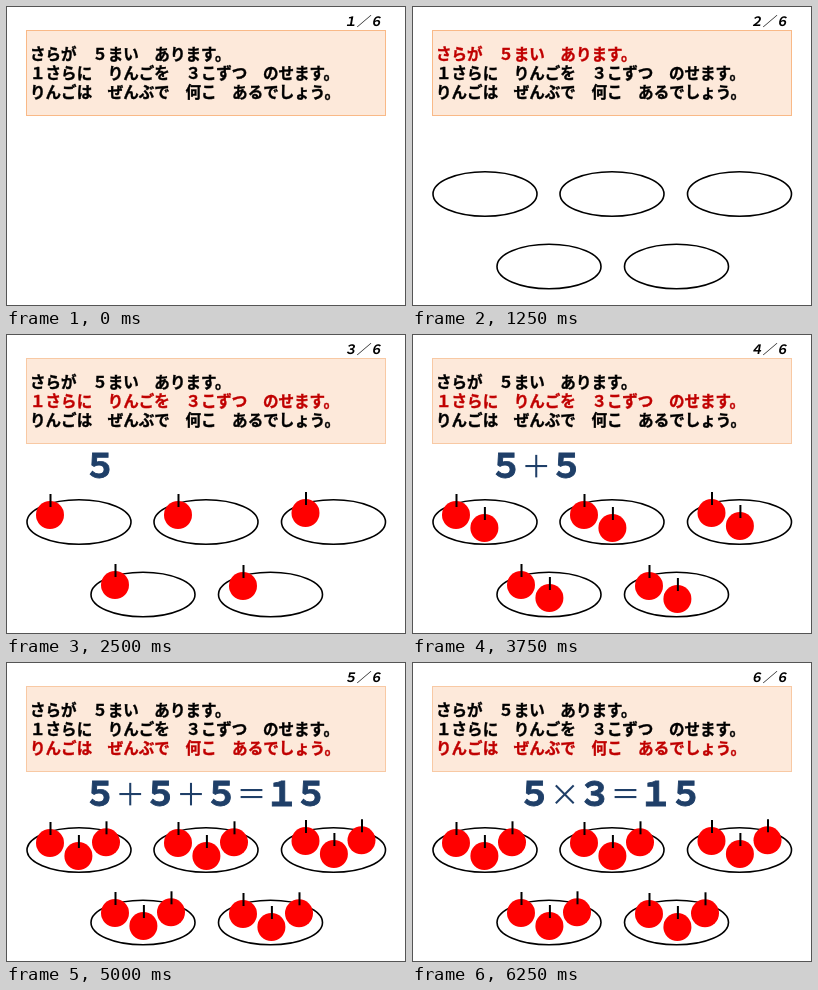
Recreate the animation shown at these times as an HTML page. Size 400 by 300 pixels, loop 7500 ms.

```html
<!DOCTYPE html>
<html lang="ja">
<head>
<meta charset="utf-8">
<style>
html, body { margin: 0; width: 100%; height: 100%; overflow: hidden; background: #fff; }
svg { display: block; width: 100vw; height: 100vh; }
text { font-family: "Noto Sans CJK JP", "Noto Sans CJK", sans-serif; font-weight: 900; }
.line { font-size: 15.55px; stroke-width: .35; }
.page { font-size: 13px; text-anchor: middle; }
.sum { fill: #1f3f68; text-anchor: middle; }
.digit { font-size: 34px; stroke: #1f3f68; stroke-width: .9; }
.sign { font-size: 30px; font-weight: 500; }
</style>
</head>
<body>
<svg viewBox="0 0 400 300">
  <rect width="400" height="300" fill="#fff"/>
  <rect x=".5" y=".5" width="399" height="299" fill="none" stroke="#555"/>
  <rect id="box" x="20.5" y="24.5" width="359" height="85" fill="#fde9da"/>
  <g id="lines"></g>
  <g id="page" transform="translate(0 20) skewX(-10)"></g>
  <g id="plates" fill="none" stroke="#000" stroke-width="1.6"></g>
  <g id="apples"></g>
  <g id="sums"></g>
</svg>
<script>
const STEP = 1250;
const $ = id => document.getElementById(id);

function add(parent, tag, attrs, text = '') {
  const node = document.createElementNS('http://www.w3.org/2000/svg', tag);
  for (const key in attrs) node.setAttribute(key, attrs[key]);
  node.textContent = text;
  parent.append(node);
  return node;
}

const show = (node, on) => node.setAttribute('visibility', on ? 'visible' : 'hidden');

const lines = [
  'さらが　５まい　あります。',
  '１さらに　りんごを　３こずつ　のせます。',
  'りんごは　ぜんぶで　何こ　あるでしょう。'
].map((words, i) => add($('lines'), 'text', { class: 'line', x: 24, y: 54.3 + i * 18.8 }, words));

const pageDigits = [344.5, 357.3, 370].map((x, i) =>
  add($('page'), 'text', { class: 'page', x, y: 0 }, ['１', '／', '６'][i]));

// Plate centre, then the position of its first apple
const plates = [
  [73, 188, 44, 181], [200, 188, 172, 181], [327.5, 188, 299.5, 179],
  [137, 260.5, 109, 251], [264.5, 260.5, 237, 252]
];
for (const [cx, cy] of plates) add($('plates'), 'ellipse', { cx, cy, rx: 52, ry: 22.3 });

const apples = [[0, 0], [28.4, 13], [56, -.7]].map(([dx, dy]) => {
  const group = add($('apples'), 'g', {});
  for (const [, , x, y] of plates) {
    add(group, 'circle', { cx: x + dx, cy: y + dy, r: 14, fill: '#f00' });
    add(group, 'path', { d: `M${x + dx + .5} ${y + dy - 21}v13`, stroke: '#000', 'stroke-width': 2 });
  }
  return group;
});

function makeSum(chars, start, lastX) {
  const group = add($('sums'), 'g', {});
  [...chars].forEach((char, i) => {
    const isDigit = /[０-９]/.test(char);
    const x = i === chars.length - 1 && lastX ? lastX : start + i * 30.3;
    add(group, 'text', { class: 'sum ' + (isDigit ? 'digit' : 'sign'), x, y: isDigit ? 144 : 142.5 }, char);
  });
  return group;
}
const sums = [
  makeSum('５', 94), makeSum('５＋５', 94),
  makeSum('５＋５＋５＝１５', 94, 305), makeSum('５×３＝１５', 122.5)
];

// Highlighted line, apples per plate, visible sum
const steps = [[-1, 0, -1], [0, 0, -1], [1, 1, 0], [1, 2, 1], [2, 3, 2], [2, 3, 3]];
let current = -1;

function draw(now) {
  const index = Math.floor(now / STEP) % steps.length;
  if (index !== current) {
    current = index;
    const [active, count, sum] = steps[index];
    lines.forEach((line, i) => {
      const color = i === active ? '#c00000' : '#000';
      line.setAttribute('fill', color);
      line.setAttribute('stroke', color);
    });
    pageDigits[0].textContent = '１２３４５６'[index];
    $('box').setAttribute('stroke', index < 2 ? '#f9b987' : '#f8c9a4');
    show($('plates'), index > 0);
    apples.forEach((group, i) => show(group, i < count));
    sums.forEach((group, i) => show(group, i === sum));
  }
}

const origin = performance.now();
function tick() {
  draw(performance.now() - origin);
  requestAnimationFrame(tick);
}
tick();
</script>
</body>
</html>
```
